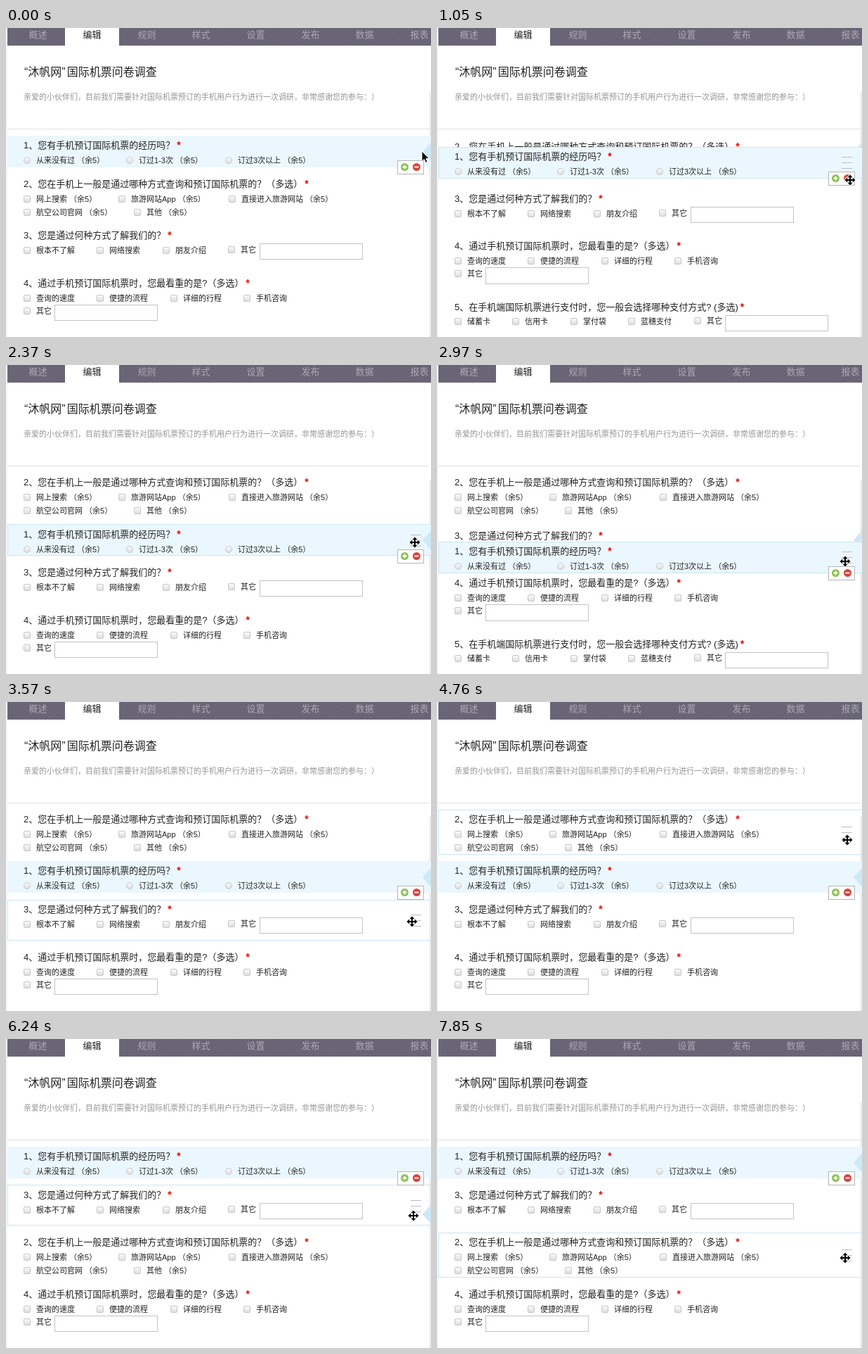
An HTML page that plays this animation: 605 px wide and 439 px high, repeating every 8000 ms.

```html
<!DOCTYPE html>
<html>
<head>
<meta charset="utf-8">
<title>问卷编辑</title>
<style>
html, body { margin: 0; width: 100%; height: 100%; overflow: hidden; background: #fff; }
body { font: 13px/20px "Liberation Sans", "Noto Sans CJK SC", "Noto Sans CJK", sans-serif; color: #222; text-spacing-trim: space-all; }
#stage { position: relative; width: 605px; height: 439px; overflow: hidden; background: #fff; }
#stage div, #stage svg, .opt i, .opt span { position: absolute; white-space: nowrap; box-sizing: border-box; }
#edge { left: 0; top: 0; width: 2px; height: 439px; background: #f1f8fc; }
#nav { left: 2px; top: 0; width: 603px; height: 25px; color: #aca8b6; font-weight: 500;
  background: repeating-linear-gradient(135deg, #6d6879 0 2px, #676273 2px 4px); }
#nav div { top: 0; width: 77px; height: 25px; text-align: center; }
#nav .on { background: #fff; color: #222; }
#title { left: 26px; top: 51px; font-size: 16px; line-height: 24px; }
#title span { margin-right: 2px; }
#intro { left: 25px; top: 88px; font-size: 11px; font-weight: 500; color: #949494; }
#rule { left: 2px; top: 143px; width: 601px; height: 1px; background: #e2e2e2; }
.item { left: 2px; width: 604px; border: 1px solid transparent; }
.item.picked { background: #ebf7fe; border: 0; z-index: 1; }
.item.hover { border: 1px solid #cde6f2; }
.item.drag { z-index: 3; }
.body { left: 0; top: 0; }
.name { left: 23px; top: 4px; }
.name b { margin-left: 3px; font-size: 14px; line-height: 0; color: #e00; }
.opt { font-size: 11px; }
.opt i { left: 0; top: 5px; width: 10px; height: 10px; border: 1px solid #c6c6c6; border-radius: 2px; background: linear-gradient(#fafafa, #dedede); }
.radio .opt i { border-radius: 50%; }
.opt span { left: 18px; top: 0; }
.field { width: 147px; height: 23.6px; border: 1px solid #c3c3c3; background: #fff; }
.grip { left: 574px; width: 15px; height: 17px; visibility: hidden;
  background: repeating-linear-gradient(#b9bec2 0 1px, transparent 1px 8px); }
.hover .grip { visibility: visible; }
.tools { left: 555px; top: 35px; width: 38px; height: 20px; border: 1px solid #b5b5b5; background: #fff; }
#panel { left: 603px; width: 4px; height: 600px; border-left: 1px solid #dcdfe1; background: #f4f8fa; }
#notch { left: 593px; width: 12px; height: 28px; z-index: 2; background: #cfe8f7; clip-path: polygon(100% 0, 0 50%, 100% 100%); }
.pointer { z-index: 5; overflow: visible; left: 0; top: 0; }
</style>
</head>
<body>
<div id="stage">
  <div id="edge"></div>
  <div id="nav"></div>
  <div id="title"><span>“沐帆网”</span>国际机票问卷调查</div>
  <div id="intro">亲爱的小伙伴们，目前我们需要针对国际机票预订的手机用户行为进行一次调研，非常感谢您的参与：）</div>
  <div id="rule"></div>
  <div id="panel"></div>
  <div id="list"></div>
  <div id="notch"></div>
  <svg class="pointer" id="arrow" width="1" height="1">
    <path d="M0 0V14.500L3.300 11.500L5.600 16.500L8 15.400L5.800 10.500H10.300Z" fill="#000" stroke="#fff"/>
  </svg>
  <svg class="pointer" id="move" width="1" height="1">
    <path d="M0-7.500L3.500-3.800H1V-1H3.800V-3.500L7.500 0L3.800 3.500V1H1V3.800H3.500L0 7.500L-3.500 3.800H-1V1H-3.800V3.500L-7.500 0L-3.800-3.500V-1H-1V-3.800H-3.500Z"
      fill="#000" stroke="#fff" stroke-width="1.600" paint-order="stroke"/>
  </svg>
</div>
<script>
const LOOP = 8000, STEP = 146, LIST_TOP = 153, GAP = 2;
const $ = id => document.getElementById(id);

function add(parent, cls, html = '', style = {}) {
  const el = document.createElement('div');
  el.className = cls;
  el.innerHTML = html;
  for (const k in style) el.style[k] = style[k] + 'px';
  parent.appendChild(el);
  return el;
}

['概述', '编辑', '规则', '样式', '设置', '发布', '数据', '报表'].forEach((s, i) =>
  add($('nav'), i === 1 ? 'on' : '', s, { left: Math.round(4.5 + 77.6 * i) }));

// opts: x, centre y, label; field: x, y
const items = [
  { name: '1、您有手机预订国际机票的经历吗？', h: 45, slot: 54.4, kind: 'radio',
    opts: [[25, 35, '从来没有过 （余5）'], [171, 35, '订过1-3次 （余5）'], [312, 35, '订过3次以上 （余5）']] },
  { name: '2、您在手机上一般是通过哪种方式查询和预订国际机票的？（多选）', h: 64.2, slot: 73.3,
    opts: [[25, 35, '网上搜索 （余5）'], [160, 35, '旅游网站App （余5）'], [317, 35, '直接进入旅游网站 （余5）'],
      [25, 54, '航空公司官网 （余5）'], [182, 54, '其他 （余5）']] },
  { name: '3、您是通过何种方式了解我们的？', h: 58, slot: 67.8, field: [361, 25],
    opts: [[25, 35, '根本不了解'], [129, 35, '网络搜索'], [223, 35, '朋友介绍'], [316, 34, '其它']] },
  { name: '4、通过手机预订国际机票时，您最看重的是?（多选）', h: 78, slot: 87, field: [69, 44],
    opts: [[25, 35, '查询的速度'], [129, 35, '便捷的流程'], [234, 35, '详细的行程'], [338, 35, '手机咨询'], [25, 53, '其它']] },
  { name: '5、在手机端国际机票进行支付时，您一般会选择哪种支付方式? (多选)', h: 58, slot: 68, field: [410, 24.4],
    opts: [[25, 34, '储蓄卡'], [107, 34, '信用卡'], [190, 34, '掌付袋'], [272, 34, '蓝穗支付'], [366, 33, '其它']] },
  { name: '6、您对手机预订国际机票的服务还有哪些意见和建议？', h: 58, slot: 66, opts: [] }
];

items.forEach((it, i) => {
  it.el = add($('list'), 'item', '', { height: it.h });
  it.body = add(it.el, 'body ' + (it.kind || ''));
  add(it.body, 'name', it.name + '<b>*</b>');
  for (const [x, y, label] of it.opts)
    add(it.body, 'opt', `<i></i><span>${label}</span>`, { left: x - 2, top: y - 10 });
  if (it.field) add(it.body, 'field', '', { left: it.field[0] - 2, top: it.field[1] });
  add(it.body, 'grip', '', { top: Math.floor(it.h / 2) - 8 });
  if (i === 0) {
    const icon = (x, fill, d) => `<circle cx="${x}" cy="8.500" r="5.500" fill="${fill}"/><path d="${d}" stroke="#fff" stroke-width="1.800"/>`;
    add(it.body, 'tools', '<svg width="36" height="18">' +
      icon(9.5, '#8cc152', 'M6.500 8.500h6M9.500 5.500v6') + icon(26.5, '#d9453f', 'M23.500 8.500h6') + '</svg>');
  }
});

// Tracks: start, number of steps, target values
const cursor = [
  [0, 1, 592, 175], [150, 2, 586, 186], [1050, 1, 588, 216], [1194, 2, 585, 238],
  [1790, 2, 582, 248], [2075, 3, 582, 252], [2820, 4, 580, 306], [3570, 1, 578, 312],
  [4010, 7, 585, 177], [5060, 1, 586, 178], [5360, 2, 583, 243], [5650, 2, 584, 288],
  [5940, 3, 580, 251], [6970, 7, 581, 311]
];
const panel = [
  [0, 1, 176], [2075, 1, 215], [2230, 1, 239], [2370, 1, 249],
  [6380, 1, 210], [6530, 1, 186], [6670, 1, 176]
];
const drags = [
  { id: 0, from: 1050, to: 1936, top: [[1050, 1, 169], [1194, 2, 196], [1790, 1, 216]], gap: [[1050, 1, 0], [1790, 1, 1]] },
  { id: 0, from: 2820, to: 3570, top: [[0, 1, 226], [2820, 4, 276]], gap: [[2820, 1, 1]] },
  { id: 1, from: 5360, to: 5940, top: [[5360, 1, 180], [5506, 1, 207.4], [5650, 2, 262]], gap: [[5360, 1, 0], [5650, 2, 2]] }
];

function at(track, t) {
  let v = track[0].slice(2);
  for (const [start, n, ...to] of track) {
    if (t < start) break;
    const k = Math.min(n, Math.floor((t - start) / STEP) + 1);
    v = v.map((a, i) => a + (to[i] - a) * k / n);
  }
  return v;
}

const orderAt = t => t < 1936 ? [0, 1, 2, 3, 4, 5] : t < 5940 ? [1, 0, 2, 3, 4, 5] : [0, 2, 1, 3, 4, 5];

function draw(t) {
  const [cx, cy] = at(cursor, t);
  const drag = drags.find(d => t >= d.from && t < d.to);
  const gap = drag ? at(drag.gap, t)[0] : -1;
  const rest = orderAt(t).filter(i => !drag || i !== drag.id);
  const tops = [];
  let y = LIST_TOP, hover = drag ? drag.id : -1;

  rest.forEach((id, n) => {
    if (n === gap) y += GAP;
    tops[id] = y;
    if (!drag && t >= 150 && cy >= y && cy < y + items[id].slot) hover = id;
    y += items[id].slot;
  });
  if (drag) tops[drag.id] = at(drag.top, t)[0];

  items.forEach((it, id) => {
    const on = id === hover;
    it.el.className = 'item' + (id === 0 ? ' picked' : '') + (on ? ' hover' : '') + (drag && on ? ' drag' : '');
    it.el.style.top = tops[id] + 'px';
    // keep contents still whether or not the frame has a border
    const inset = id === 0 && !on ? 0 : -1;
    it.body.style.left = inset + 'px';
    it.body.style.top = inset + 0.2 + 'px';
  });

  const [py] = at(panel, t);
  $('panel').style.top = py - 86 + 'px';
  $('notch').style.top = py - 14 + 'px';
  $('arrow').style.display = t < 150 ? '' : 'none';
  $('move').style.display = t < 150 ? 'none' : '';
  for (const id of ['arrow', 'move'])
    $(id).style.transform = `translate(${Math.round(cx)}px, ${Math.round(cy)}px)`;
}

const began = performance.now();
function tick() {
  draw((performance.now() - began) % LOOP);
  requestAnimationFrame(tick);
}
draw(0);
requestAnimationFrame(tick);
</script>
</body>
</html>
```
